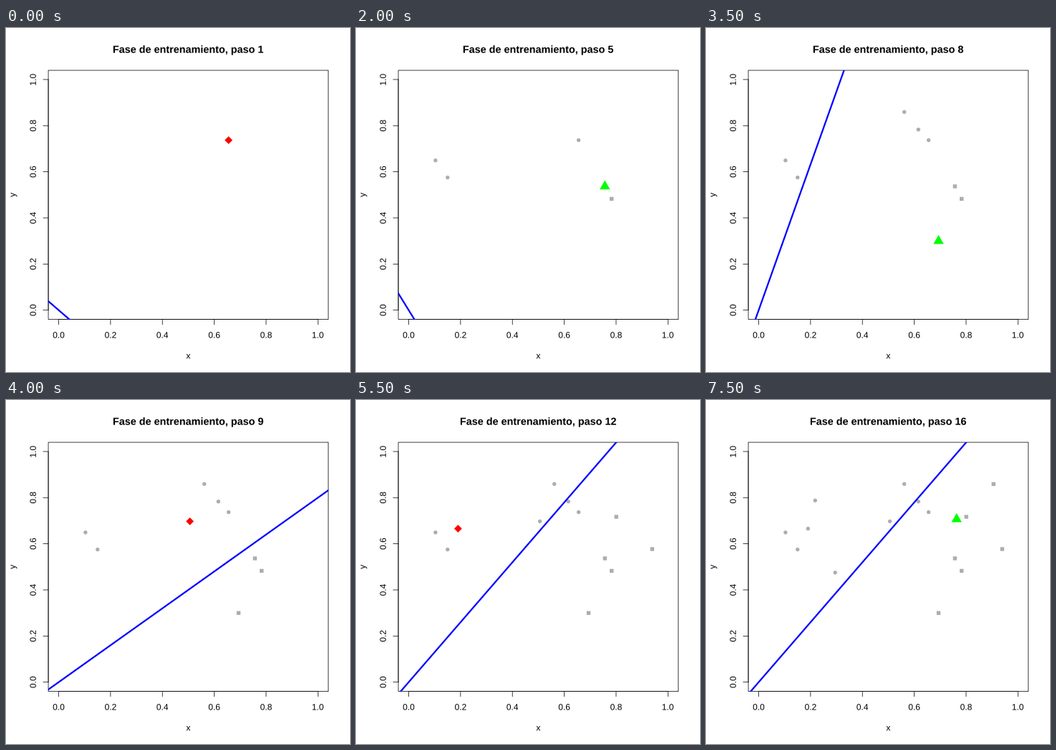
These frames come from a looping animation (480 px wide and 480 px high, 8000 ms). A matplotlib script:

```python
import matplotlib.pyplot as plt
from matplotlib.animation import FuncAnimation
from matplotlib.patches import Circle, PathPatch, Polygon, Rectangle
from matplotlib.textpath import TextPath
from matplotlib.transforms import Affine2D

SIZE = 480
LEFT, RIGHT, TOP, BOTTOM = 59.04, 449.76, 59.04, 406.56
MID_X, MID_Y = (LEFT + RIGHT) / 2, (TOP + BOTTOM) / 2
X0, Y0 = 73.51, 393.69      # pixel position of the data point (0, 0)
UNIT_X, UNIT_Y = 361.78, 321.78
EM = 14.4                   # height of one margin line
TICK = EM / 2
THIN, THICK = 0.75, 2.25
GREY = "#adadad"

# Training samples in order: pixel position, class, classified correctly
SAMPLES = [
    (310.6, 156.5, "a", False), (356.7, 238.4, "b", True),
    (110.9, 184.8, "a", False), (127.8, 208.6, "a", False),
    (347.3, 221.0, "b", True), (296.3, 141.7, "a", False),
    (276.7, 117.2, "a", False), (324.5, 297.2, "b", True),
    (256.6, 169.3, "a", False), (363.2, 163.0, "b", False),
    (413.3, 208.0, "b", True), (142.4, 179.5, "a", False),
    (401.2, 117.3, "b", True), (152.3, 140.2, "a", True),
    (180.2, 240.8, "a", True), (349.7, 166.3, "b", True),
]

# Slope of the decision line after each weight update, by step
SLOPES = {1: -0.97, 3: -1.29, 4: -1.82, 6: -3.5,
          7: 3.16, 9: 0.8, 10: 3.668, 12: 1.299}

fig = plt.figure(figsize=(SIZE / 72, SIZE / 72), dpi=72, facecolor="white")
ax = fig.add_axes([0, 0, 1, 1])
ax.set(xlim=(0, SIZE), ylim=(SIZE, 0))
ax.axis("off")


def label(x, y, text, size=12, angle=0, weight="normal"):
    """Text as outlines, centred on x along its baseline."""
    font = {"family": "Liberation Sans", "weight": weight}
    path = TextPath((0, 0), text, size=size, prop=font)
    box = path.get_extents()
    place = (Affine2D().translate(-(box.x0 + box.x1) / 2, 0)
             .rotate_deg(angle).scale(1, -1).translate(x, y))
    return ax.add_patch(PathPatch(place.transform_path(path), fc="black",
                                  lw=0, snap=False, zorder=6))


def stroke(xs, ys):
    ax.plot(xs, ys, color="black", lw=THIN, snap=False,
            solid_capstyle="round")


def draw_axes():
    ax.add_patch(Rectangle((LEFT, TOP), RIGHT - LEFT, BOTTOM - TOP, fill=False,
                           ec="black", lw=THIN, snap=False, zorder=1))
    stroke([X0, X0 + UNIT_X], [BOTTOM, BOTTOM])
    stroke([LEFT, LEFT], [Y0, Y0 - UNIT_Y])
    for i in range(6):
        v = i / 5
        x, y = X0 + v * UNIT_X, Y0 - v * UNIT_Y
        stroke([x, x], [BOTTOM, BOTTOM + TICK])
        stroke([LEFT - TICK, LEFT], [y, y])
        label(x, BOTTOM + 1.8 * EM, f"{v:.1f}")
        label(LEFT - 1.2 * EM, y, f"{v:.1f}", angle=90)
    label(MID_X, BOTTOM + 3.8 * EM, "x")
    label(LEFT - 3.2 * EM, MID_Y, "y", angle=90)


def seen_mark(x, y, kind, r=2.7):
    if kind == "a":
        return Circle((x, y), r, fc=GREY, lw=0, zorder=3)
    return Rectangle((x - r, y - r), 2 * r, 2 * r, fc=GREY, lw=0,
                     snap=False, zorder=3)


def current_mark(x, y, correct, r=5.4):
    if correct:
        color = "#00ff00"
        w, up, down = 1.347 * r, 1.555 * r, 0.778 * r
        pts = [(x, y - up), (x + w, y + down), (x - w, y + down)]
    else:
        color = "#ff0000"
        pts = [(x, y - r), (x + r, y), (x, y + r), (x - r, y)]
    return Polygon(pts, fc=color, lw=0, snap=False, zorder=5)


draw_axes()
titles = [label(MID_X, 34.7, f"Fase de entrenamiento, paso {k + 1}",
                size=14.4, weight="bold") for k in range(len(SAMPLES))]
line, = ax.plot([], [], color="#0000ff", lw=THICK, zorder=4)
line.set_clip_path(Rectangle((LEFT, TOP), RIGHT - LEFT, BOTTOM - TOP,
                             transform=ax.transData))
seen = [ax.add_patch(seen_mark(x, y, kind)) for x, y, kind, _ in SAMPLES]
current = [ax.add_patch(current_mark(x, y, ok)) for x, y, _, ok in SAMPLES]


def update(i):
    slope = SLOPES[max(s for s in SLOPES if s <= i + 1)]
    xs = (-0.2, 1.2)
    line.set_data([X0 + x * UNIT_X for x in xs],
                  [Y0 - slope * x * UNIT_Y for x in xs])
    for k in range(len(SAMPLES)):
        titles[k].set_visible(k == i)
        seen[k].set_visible(k < i)
        current[k].set_visible(k == i)
    return [line, *titles, *seen, *current]


anim = FuncAnimation(fig, update, frames=len(SAMPLES), interval=500,
                     repeat=True, repeat_delay=0)
plt.show()
```
